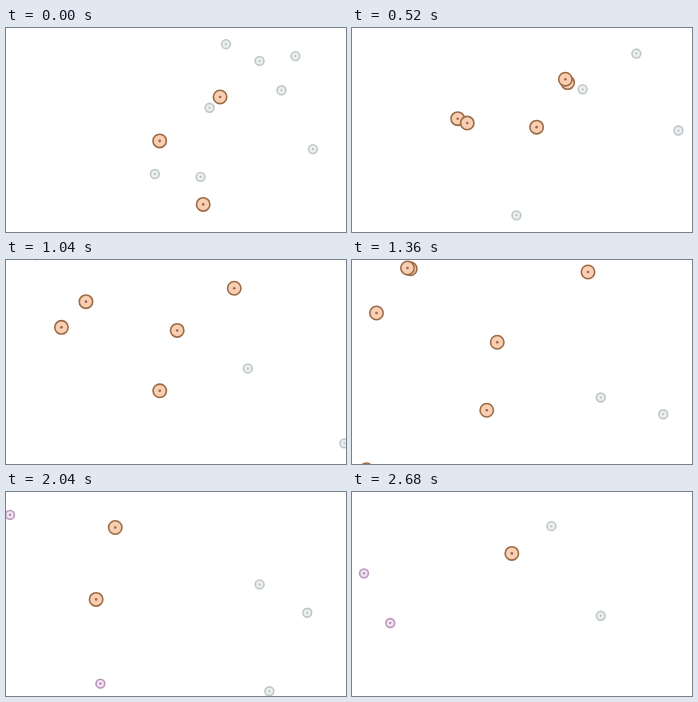
Write an HTML page with a canvas that moves like this. It is 340x204 px and loops after 2.72 s.

```html
<!DOCTYPE html>
<html lang="en">
<head>
<meta charset="utf-8">
<title>Spreading dots</title>
<style>
  html, body { margin: 0; width: 100%; height: 100%; overflow: hidden; background: #fff; }
  canvas { display: block; width: 340px; height: 204px; }
</style>
</head>
<body>
<canvas id="stage"></canvas>
<script>
const W = 340, H = 204, LOOP = 2720, STEP = 40, LEAD = 24;
const TOUCH = 11, RECOVERY = 1840, NEVER = Infinity;

const LOOKS = {
  healthy: { r: 4.4, line: 1.6, ring: '#bfc7c8', fill: '#eceff0', dot: '#b0babb', core: 1 },
  sick: { r: 6.7, line: 1.6, ring: '#9c6b45', fill: '#f8cfb3', dot: '#a0654a', core: 1.3 },
  well: { r: 4.4, line: 1.6, ring: '#b995b9', fill: '#f0e2ef', dot: '#a87aa6', core: 1.1 }
};

// Every dot glides straight from its first to its last point in one loop.
function dot(from, to, sickAt = NEVER) {
  return {
    sickAt,
    at(t) {
      const k = t / LOOP;
      return from.map((a, i) => a + (to[i] - a) * k);
    },
    state(t) {
      if (t < this.sickAt) return 'healthy';
      return t < this.sickAt + RECOVERY ? 'sick' : 'well';
    }
  };
}

const dots = [
  dot([219.5, 14], [278, 261]),
  dot([275, 64], [324, -137]),
  dot([290, 30], [221, -188]),
  dot([306, 122], [413, 20]),
  dot([196, 147], [31, 358]),
  dot([426.5, 278], [196, 30.5]),
  dot([468.5, 111], [245.5, 124]),
  dot([203, 81], [269, -57]),
  dot([255.5, 32], [35, 132.5]),
  dot([215.5, 67.5], [54, 233]),
  dot([156, 114], [-107, -8], 0),
  dot([197, 174.5], [218.5, 392], 0),
  dot([150.5, 148.5], [-34, -131]),
  dot([-52, -47], [163, 63]),
  dot([69, 325.5], [-40, 94], 0),
  dot([-21.5, -163.5], [12.5, 85], -RECOVERY)
];
dots[9].sickAt = 0;

// A sick dot infects every healthy one it touches.
function spread() {
  for (let t = 0; t < LOOP; t += STEP / 4) {
    const sick = dots.filter(d => d.state(t) === 'sick');
    for (const d of dots.filter(d => d.sickAt === NEVER)) {
      const [x, y] = d.at(t);
      const touched = sick.some(s => {
        const [sx, sy] = s.at(t);
        return Math.hypot(x - sx, y - sy) < TOUCH;
      });
      if (touched) d.sickAt = t;
    }
  }
}

const canvas = document.getElementById('stage');
const ratio = window.devicePixelRatio || 1;
canvas.width = W * ratio;
canvas.height = H * ratio;
const ctx = canvas.getContext('2d');
ctx.scale(ratio, ratio);

function disc(x, y, r, color) {
  ctx.beginPath();
  ctx.arc(x, y, r, 0, Math.PI * 2);
  ctx.fillStyle = color;
  ctx.fill();
}

function drawDot([x, y], look) {
  disc(x, y, look.r, look.fill);
  ctx.lineWidth = look.line;
  ctx.strokeStyle = look.ring;
  ctx.stroke();
  disc(x, y, look.core, look.dot);
}

function render(ms) {
  const t = Math.max(ms, LEAD);
  ctx.fillStyle = '#fff';
  ctx.fillRect(0, 0, W, H);
  for (const d of dots) drawDot(d.at(t), LOOKS[d.state(t)]);
}

const start = performance.now();
function tick() {
  const ms = (performance.now() - start) % LOOP;
  render(Math.floor(ms / STEP) * STEP);
  requestAnimationFrame(tick);
}

spread();
tick();
</script>
</body>
</html>
```
